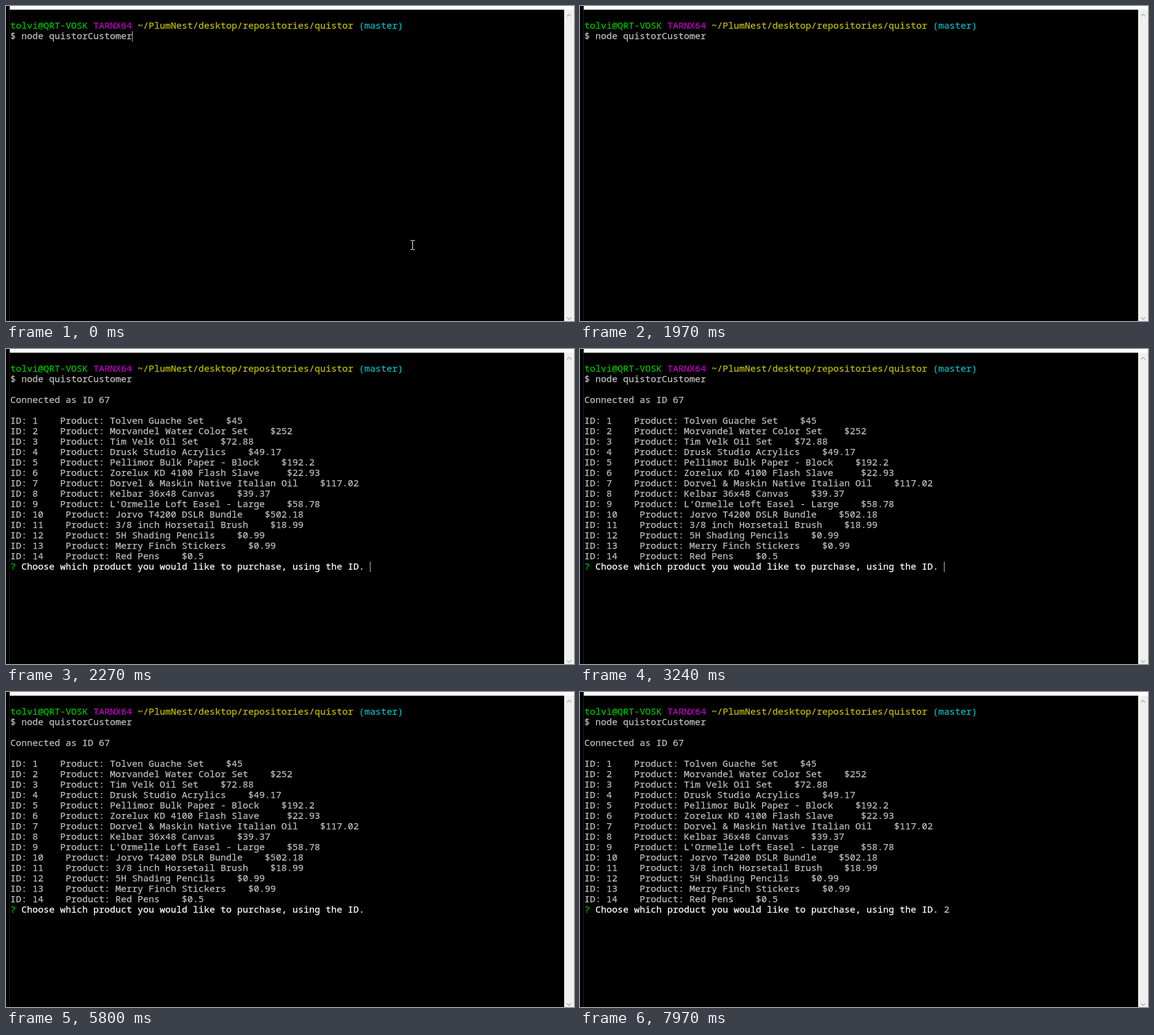
Recreate the animation shown at these times as an HTML page. Size 924 px wide and 514 px high, loop 8000 ms.

```html
<!DOCTYPE html>
<html lang="en">
<head>
<meta charset="utf-8">
<title>Terminal shop</title>
<style>
  html, body { margin: 0; width: 100%; height: 100%; overflow: hidden; background: #000; }
  #stage { position: relative; width: 924px; height: 514px; overflow: hidden; background: #000; }
  #stage > * { position: absolute; }
  pre { left: 7px; top: 23px; margin: 0; color: #bfbfbf; -webkit-text-stroke: 0.25px;
        font: 15px/17px "Noto Sans Mono", "DejaVu Sans Mono", monospace; font-variant-ligatures: none; }
  .green { color: #00bf00; }
  .magenta { color: #bf00bf; }
  .yellow { color: #bfbf00; }
  .cyan { color: #00bfbf; }
  .white { color: #fff; }
  #caret { width: 1px; height: 17px; background: #bfbfbf; }
  svg { left: 0; top: 0; }
</style>
</head>
<body>
<div id="stage">
  <svg width="924" height="514">
    <path d="M6 0H924V6H6Z" fill="#fff"/>
    <path d="M5 6H6V514H5Z" fill="#222"/>
    <path d="M908 6H924V514H908Z" fill="#f0f0f0"/>
    <path d="M912.5 17L916 13.5L919.5 17M912.5 508L916 511.5L919.5 508" fill="none" stroke="#b4b4b4" stroke-width="1.5"/>
    <path id="pointer" d="M658 382.5H661M662 382.5H665M661.5 383V397M658 397.5H661M662 397.5H665" stroke="#fff"/>
  </svg>
  <pre id="screen"></pre>
  <div id="caret"></div>
</div>
<script>
const LOOP = 8000, CELL = 9, LINE = 17, LEFT = 7, TOP = 24;
const ENTER = 1130, FIRST_ROWS = 2120, ALL_ROWS = 2270, ANSWER = 7470;

const products = [
  ["Tolven Guache Set", "45"],
  ["Morvandel Water Color Set", "252"],
  ["Tim Velk Oil Set", "72.88"],
  ["Drusk Studio Acrylics", "49.17"],
  ["Pellimor Bulk Paper - Block", "192.2"],
  ["Zorelux KD 4100 Flash Slave ", "22.93"],
  ["Dorvel & Maskin Native Italian Oil", "117.02"],
  ["Kelbar 36x48 Canvas", "39.37"],
  ["L'Ormelle Loft Easel - Large", "58.78"],
  ["Jorvo T4200 DSLR Bundle", "502.18"],
  ["3/8 inch Horsetail Brush", "18.99"],
  ["5H Shading Pencils", "0.99"],
  ["Merry Finch Stickers", "0.99"],
  ["Red Pens", "0.5"]
];

const span = (color, text) => `<span class="${color}">${text}</span>`;
const row = ([name, price], i) =>
  `ID: ${i + 1}    Product: ${name.replace("&", "&amp;")}    $${price}`;

const prompt = [
  span("green", "tolvi@QRT-VOSK"), span("magenta", "TARNX64"),
  span("yellow", "~/PlumNest/desktop/repositories/quistor"), span("cyan", "(master)")
].join(" ") + "\n$ node quistorCustomer";
const rows = products.map(row);
const listing = count => `${prompt}\n\nConnected as ID 67\n\n${rows.slice(0, count).join("\n")}\n`;
const question = listing(14) + span("green", "?") + " " +
  span("white", "Choose which product you would like to purchase, using the ID.") + " ";

// The caret starts visible and toggles at each of these times.
const blinks = [140, 700, 1970, 2270, 2670, 3240, 3690, 4230, 4840, 5400, 5800, 6360, 6910, 7470, 7970];

function textAt(t) {
  if (t < FIRST_ROWS) return prompt;
  if (t < ALL_ROWS) return listing(9) + "ID: 10";
  return question + (t < ANSWER ? "" : "2");
}

function caretCell(t) {
  if (t < ENTER) return [22, 1];
  if (t < ALL_ROWS) return [0, 2];
  return [t < ANSWER ? 65 : 66, 19];
}

const screenEl = document.getElementById("screen");
const caret = document.getElementById("caret");
const pointer = document.getElementById("pointer");
let shown = "";

function draw(now) {
  const t = now % LOOP;
  const text = textAt(t);
  if (text !== shown) screenEl.innerHTML = shown = text;
  const [column, line] = caretCell(t);
  caret.style.left = LEFT + column * CELL + "px";
  caret.style.top = TOP + line * LINE + "px";
  caret.style.visibility = blinks.filter(b => b <= t).length % 2 ? "hidden" : "visible";
  pointer.style.visibility = t < ENTER ? "visible" : "hidden";
}

const start = performance.now();
function tick() {
  draw(performance.now() - start);
  requestAnimationFrame(tick);
}
tick();
</script>
</body>
</html>
```
